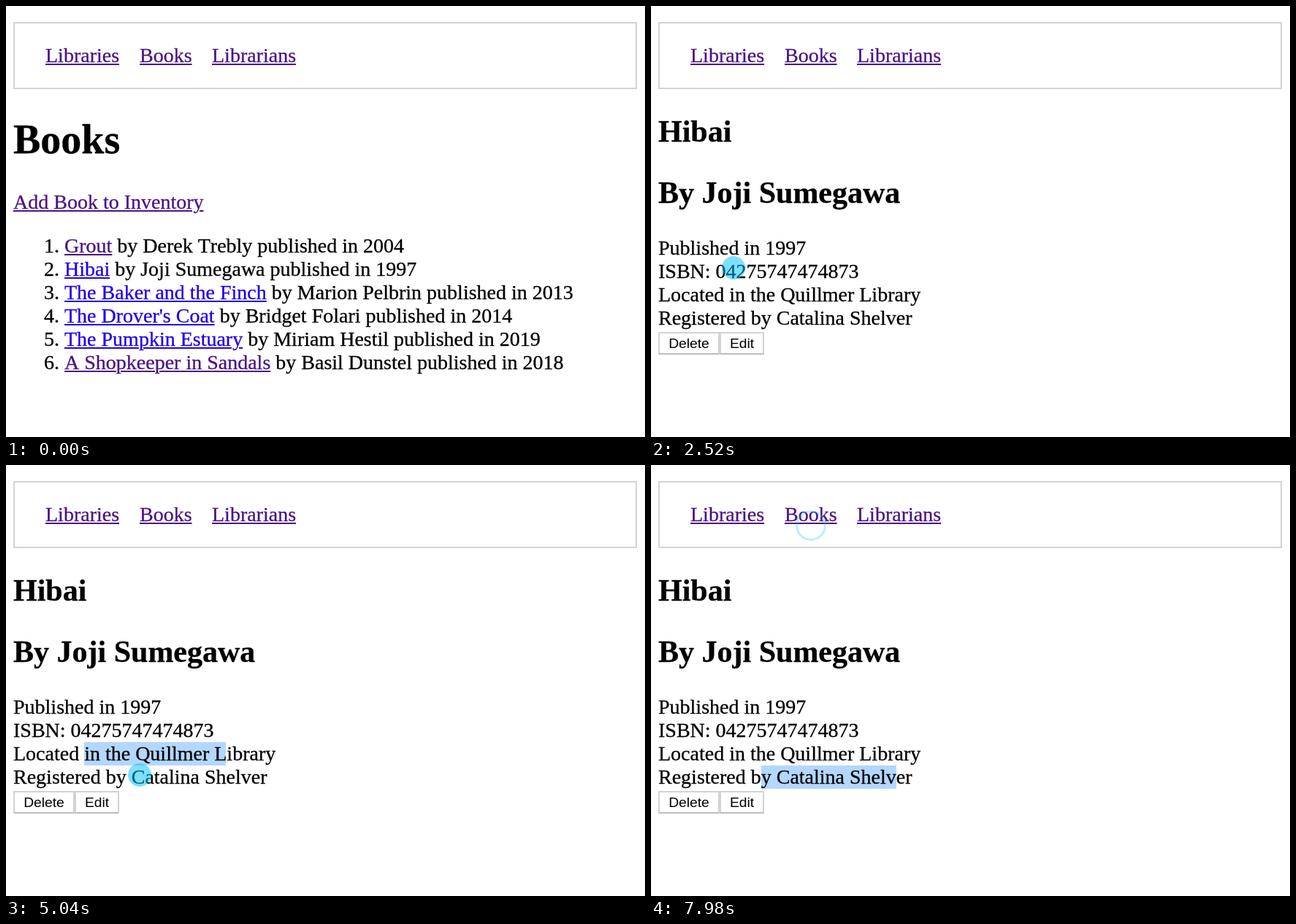
An HTML page that plays this animation: 875x591 px, repeating every 8000 ms.

```html
<!DOCTYPE html>
<html lang="en">
<head>
<meta charset="utf-8">
<title>Library inventory</title>
<style>
  html, body { margin: 0; width: 100%; height: 100%; overflow: hidden; background: #fff; }
  body {
    position: relative; color: #000; font: 28px/32px "Liberation Serif", Times, serif;
    font-kerning: none; -webkit-text-stroke: .3px;
  }
  div, h1, h2 { position: absolute; margin: 0; white-space: nowrap; }
  h1 { font-size: 56px; line-height: 62px; left: 10px; top: 152px; }
  h2 { font-size: 42px; line-height: 46px; left: 10px; font-kerning: normal; }
  u { color: #1f00ee; text-decoration: underline 2px; text-underline-offset: 2px; }
  u.visited { color: #4b1484; }
  u.active { color: #fb0007; }
  .page { inset: 0; }
  .nav { left: 10px; top: 22px; width: 850px; height: 88px; border: 2px solid #d3d3d3; }
  .button {
    top: 447px; height: 27px; box-sizing: content-box; text-align: center;
    border: 2px solid #d3d3d3; border-bottom-color: #bdbdbd;
    font: 19.25px/27px "Liberation Sans", Arial, sans-serif; -webkit-text-stroke: 0;
  }
  .selection { height: 32px; background: #b3d7ff; }
  #disc, #ring { left: 0; top: 0; border-radius: 50%; box-sizing: border-box; }
  #disc { width: 32px; height: 32px; margin: -16px; background: rgba(0, 191, 255, .5); }
  #ring { width: 42px; height: 42px; margin: -5px -21px; border: 3px solid rgba(0, 191, 255, .27); }
</style>
</head>
<body>
<div class="nav"></div>
<div style="left:54px;top:52px"><u class="visited">Libraries</u></div>
<div style="left:183px;top:52px"><u class="visited">Books</u></div>
<div style="left:282px;top:52px"><u class="visited">Librarians</u></div>

<div class="page" id="list">
  <h1>Books</h1>
  <div style="left:10px;top:253px"><u class="visited">Add Book to Inventory</u></div>
  <div style="left:52px;top:313px">
    1. <u class="visited">Grout</u> by Derek Trebly published in 2004<br>
    2. <u id="link">Hibai</u> by Joji Sumegawa published in 1997<br>
    3. <u>The Baker and the Finch</u> by Marion Pelbrin published in 2013<br>
    4. <u>The Drover's Coat</u> by Bridget Folari published in 2014<br>
    5. <u>The Pumpkin Estuary</u> by Miriam Hestil published in 2019<br>
    6. <u class="visited">A Shopkeeper in Sandals</u> by Basil Dunstel published in 2018
  </div>
</div>

<div class="page" id="detail">
  <div class="selection" id="placeSelection" style="left:107px;top:380px"></div>
  <div class="selection" id="personSelection" style="left:151px;top:412px"></div>
  <h2 style="top:149px">Hibai</h2>
  <h2 style="top:233px">By Joji Sumegawa</h2>
  <div style="left:10px;top:316px">
    Published in 1997<br>
    ISBN: 04275747474873<br>
    Located in the Quillmer Library<br>
    Registered by Catalina Shelver
  </div>
  <div class="button" style="left:10px;width:80px">Delete</div>
  <div class="button" style="left:94px;width:57px">Edit</div>
</div>

<div id="disc"></div>
<div id="ring"></div>

<script>
const LOOP = 8000, TICK = 140;
const $ = id => document.getElementById(id);
const [list, detail, link, disc, ring, placeSelection, personSelection] =
  ["list", "detail", "link", "disc", "ring", "placeSelection", "personSelection"].map($);

// Pointer stops: time, x, y
const path = [
  [420, 568, 637], [840, 283, 425], [980, 283, 425], [1680, 113, 359],
  [3080, 113, 359], [3500, 107, 389], [3780, 107, 389], [4340, 298, 396],
  [4620, 298, 396], [5040, 183, 425], [5180, 151, 430], [5320, 151, 430],
  [5740, 259, 430], [6020, 339, 427], [6720, 339, 427], [7700, 219, 67]
];
const presses = [[1960, 2380], [3780, 4480], [5320, 6020], [7980, LOOP]];
const placeWidth = [[3780, 0], [4340, 194]];
const personWidth = [[5320, 0], [5740, 103], [6020, 185]];

const within = (t, [from, to]) => t >= from && t < to;
const show = (element, visible) => { element.style.display = visible ? "" : "none"; };

// Eased values of a list of [time, ...values] at time t
function track(keys, t) {
  const next = keys.findIndex(key => key[0] > t);
  if (next === 0) return keys[0].slice(1);
  if (next < 0) return keys[keys.length - 1].slice(1);
  const [start, ...from] = keys[next - 1], [end, ...to] = keys[next];
  const p = (t - start) / (end - start), eased = p * p * (3 - 2 * p);
  return from.map((value, i) => value + (to[i] - value) * eased);
}

function draw(t) {
  const [x, y] = track(path, t);
  const pressed = presses.some(span => within(t, span));
  for (const mark of [disc, ring]) mark.style.transform = `translate(${x}px, ${y}px)`;
  show(disc, !pressed);
  show(ring, pressed);
  disc.style.opacity = within(t, [2380, 2520]) ? .5 : 1;

  show(list, t < 2240);
  show(detail, t >= 2240);
  link.className = within(t, [1960, 2240]) ? "active" : "";

  placeSelection.style.width = (t < 5320 ? track(placeWidth, t)[0] : 0) + "px";
  personSelection.style.width = track(personWidth, t)[0] + "px";
}

function frame() {
  draw(Math.floor(performance.now() % LOOP / TICK) * TICK);
  requestAnimationFrame(frame);
}
frame();
</script>
</body>
</html>
```
